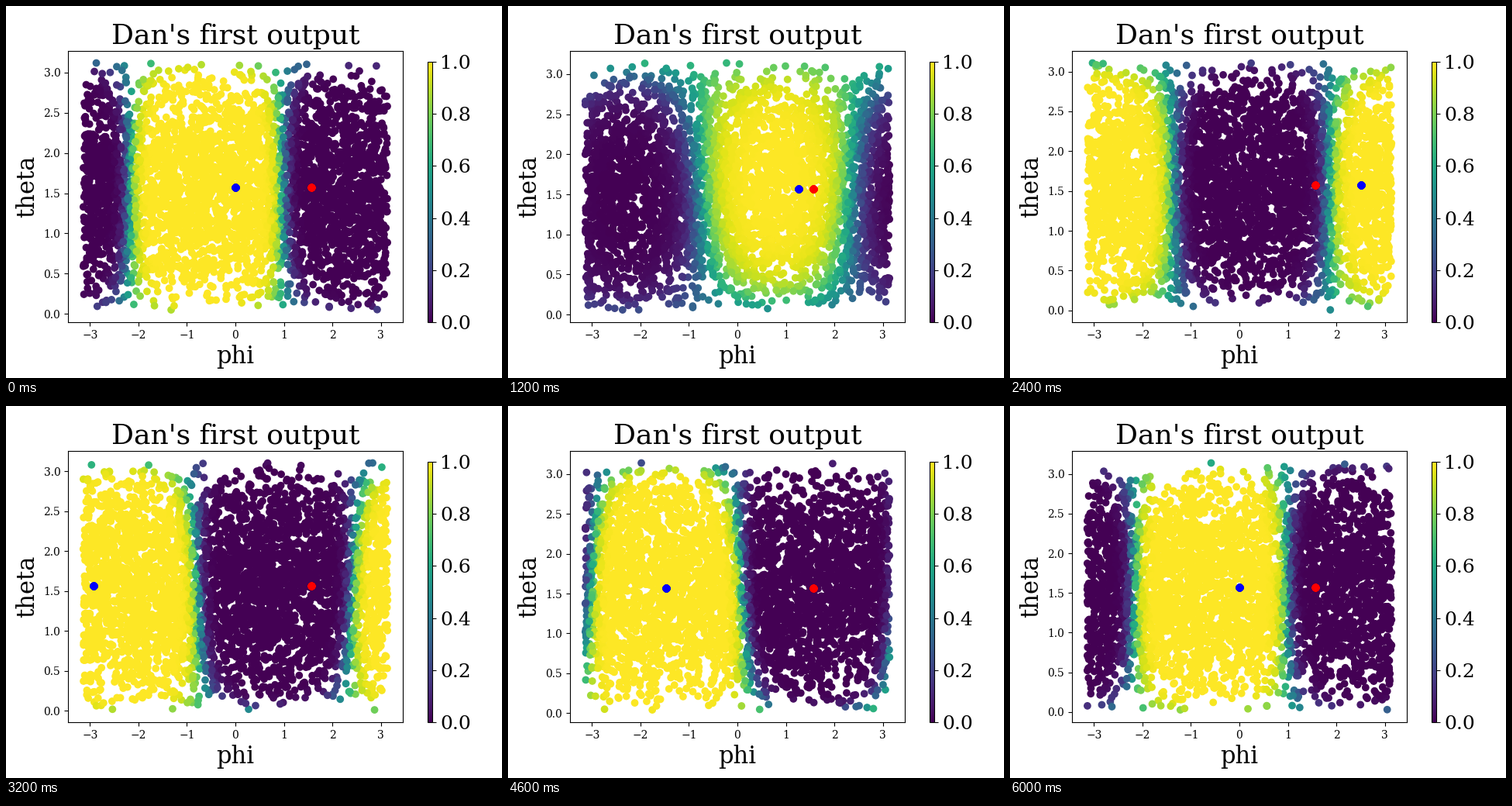
Recreate the animation shown at these times as a matplotlib script. Size 640x480 px, loop 6200 ms.

```python
import numpy as np
import matplotlib.pyplot as plt
from matplotlib.animation import FuncAnimation
from matplotlib.cm import ScalarMappable

STEPS = 31
POINTS = 4000
COPIES = 60
RED_PHI = np.pi / 2

plt.rcParams["font.family"] = "DejaVu Serif"


def wrap(angle):
    return (angle + np.pi) % (2 * np.pi) - np.pi


def sample(step):
    """Fresh points on the sphere, nearly reaching both poles."""
    rng = np.random.default_rng(100 + step)
    lo = rng.uniform(0, 0.06)
    hi = np.pi - rng.uniform(0, 0.04)
    phi = rng.uniform(-np.pi, np.pi, POINTS)
    theta = np.arccos(rng.uniform(np.cos(hi), np.cos(lo), POINTS))
    theta[:2] = lo, hi
    return phi, theta


def output(phi, theta, blue):
    """Probability that switches across a great circle following blue - red."""
    delta = wrap(blue - RED_PHI)
    x, y = np.cos(delta) - 0.75, np.sin(delta)
    sharp = np.tanh(np.hypot(x, y))
    center = RED_PHI + np.arctan2(y, x) + 0.04
    center -= 2.8 * delta * np.exp(-(delta / 0.25) ** 2)
    # Sharp fields stay saturated closer to the poles
    swing = 18 * sharp * np.sin(theta) ** (1 - 0.4 * sharp)
    tilt = 0.55 + 1.2 * np.cos(blue - 4.4)
    bias = 0.3 * np.cos(blue + 0.3)
    logit = swing * np.cos(phi - center) + tilt * np.cos(theta) + bias
    return 1 / (1 + np.exp(-logit))


def dot(phi, color):
    # Stacked copies give the marker its hard edge
    return ax.scatter(np.full(COPIES, phi), np.full(COPIES, np.pi / 2),
                      color=color)


fig, ax = plt.subplots(figsize=(6.4, 4.8), dpi=100)
fig.subplots_adjust(left=0.125, right=0.8, bottom=0.15, top=0.88)
ax.set_title("Dan's first output", fontsize=26)
ax.set_xlabel("phi", fontsize=22)
ax.set_ylabel("theta", fontsize=22)
ax.set_xlim(-1.1 * np.pi, 1.1 * np.pi)

cloud = ax.scatter(np.zeros(POINTS), np.zeros(POINTS), c=np.zeros(POINTS),
                   cmap="viridis", vmin=0, vmax=1)
red_dot = dot(RED_PHI, "red")
blue_dot = dot(0, "blue")

cax = fig.add_axes([0.85, 0.15, 0.01, 0.7])
bar = fig.colorbar(ScalarMappable(cloud.norm, "viridis"), cax=cax)
bar.ax.tick_params(labelsize=18)


def update(step):
    blue = 2 * np.pi * step / (STEPS - 1)
    phi, theta = sample(step)
    cloud.set_offsets(np.column_stack([phi, theta]))
    cloud.set_array(output(phi, theta, blue))
    blue_dot.set_offsets(np.tile([wrap(blue), np.pi / 2], (COPIES, 1)))
    lo, hi = theta.min(), theta.max()
    margin = 0.05 * (hi - lo)
    ax.set_ylim(lo - margin, hi + margin)
    return cloud, red_dot, blue_dot


anim = FuncAnimation(fig, update, frames=STEPS, interval=200, repeat=True)
plt.show()
```
